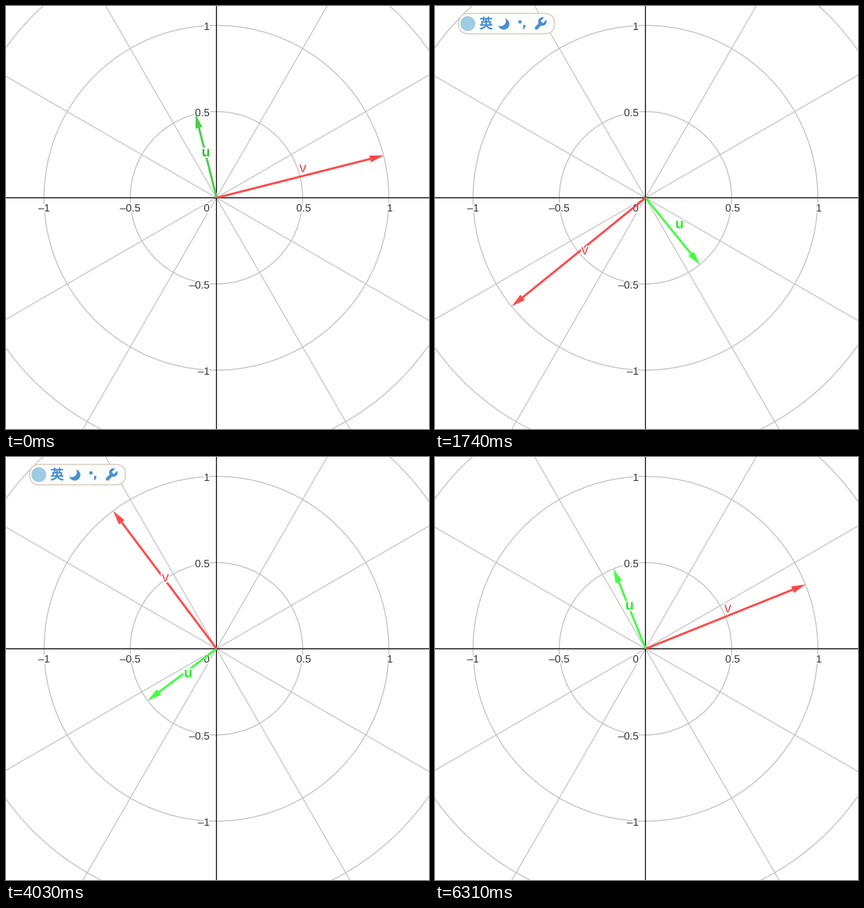
Recreate the animation shown at these times as a matplotlib script. Size 600 by 600 pixels, loop 6440 ms.

```python
import numpy as np
import matplotlib.pyplot as plt
from matplotlib.animation import FuncAnimation
from matplotlib.patches import Circle, FancyBboxPatch, Polygon
from matplotlib.patheffects import withStroke

SIZE, DPI = 600, 100
PT = 72 / DPI                      # points per pixel
LOOP_MS, TICK_MS = 6440, 20
CX, CY, UNIT = 298.5, 272.0, 244.5

RED, GREEN, FIRST_GREEN = "#ff4a4a", "#42ff42", "#48d048"
BLUE = "#4a90cf"

# (step, start in ms, angle of v in degrees); steps between are interpolated
KNOTS = np.array([
    (0, 0, 14.2), (6, 740, 109.8), (9, 1120, 157.2), (11, 1370, 185),
    (12, 1490, 185), (16, 2000, 253), (17, 2140, 267), (18, 2250, 282),
    (19, 2390, 300.9), (24, 3020, 363.5), (25, 3130, 378.5),
    (27, 3390, 408.3), (28, 3530, 424.3), (30, 3780, 456.2),
    (31, 3920, 472), (32, 4030, 486.9), (33, 4170, 502),
    (34, 4280, 516.3), (35, 4420, 531.5), (36, 4540, 547.5),
    (37, 4660, 547.5), (38, 4790, 563.5), (43, 5430, 637.8),
    (44, 5560, 652.6), (45, 5670, 667.3), (46, 5810, 682.2),
    (50, 6310, 741.9),
])
STEPS = np.arange(51)
STARTS = np.round(np.interp(STEPS, KNOTS[:, 0], KNOTS[:, 1]), -1)
ANGLES = np.interp(STEPS, KNOTS[:, 0], KNOTS[:, 2])
BAR_ON, BAR_OFF = 2, 49            # steps at which the input bar shows and hides

plt.rcParams["font.family"] = "Liberation Sans"
fig = plt.figure(figsize=(SIZE / DPI, SIZE / DPI), dpi=DPI, facecolor="white")
ax = fig.add_axes([0, 0, 1, 1])
ax.set_xlim(0, SIZE)
ax.set_ylim(SIZE, 0)
ax.axis("off")


def halo(px):
    return [withStroke(linewidth=px * PT, foreground="white")]


def line(xs, ys, color, px, z, **kw):
    return ax.plot(xs, ys, color=color, lw=px * PT, zorder=z, **kw)[0]


def draw_grid():
    for n in (1, 2, 3):
        ax.add_patch(Circle((CX, CY), n * UNIT / 2, fill=False, ec="#c3c3c3",
                            lw=1.4 * PT, zorder=1))
    for deg in (30, 60, 120, 150):
        dx, dy = 700 * np.cos(np.radians(deg)), 700 * np.sin(np.radians(deg))
        line([CX - dx, CX + dx], [CY + dy, CY - dy], "#c3c3c3", 1.3, 1)
    line([0, SIZE], [CY, CY], "#3c3c3c", 1.8, 3, snap=False)
    line([CX, CX], [0, SIZE], "black", 1.3, 3, snap=False)


def draw_ticks():
    def tick(x, y, s, ha):
        ax.text(x, y, s, ha=ha, va="baseline", fontsize=15 * PT,
                color="#333333", path_effects=halo(4), zorder=2)

    for value, s in ((-1, "–1"), (-0.5, "–0.5"), (0.5, "0.5"), (1, "1")):
        tick(CX + value * UNIT + (1 if value > 0 else 0) - 0.5 * (value < 0) + 0.5,
             291.5, s, "center")
        tick(289, CY - value * UNIT + 6.5, s, "right")
    tick(289, 291.5, "0", "right")


def draw_bar():
    """Input-method bar in the top left corner."""
    def disc(x, y, r, color, z):
        return ax.add_patch(Circle((x, y), r, fc=color, ec="none", zorder=z))

    fill = "#fdfdfc"
    pill = FancyBboxPatch((33.5, 10.5), 136, 29,
                          boxstyle="round,pad=0,rounding_size=14.5",
                          fc=fill, ec="#dccdbf", lw=1.6 * PT, zorder=10)
    ax.add_patch(pill)
    glyph = ax.text(72.5, 31.5, "英", family="Noto Sans CJK JP", ha="center",
                    va="baseline", fontsize=19 * PT, color=BLUE, zorder=11,
                    path_effects=[withStroke(linewidth=0.8 * PT, foreground=BLUE)])
    return [
        pill, glyph,
        disc(46.5, 25, 10.5, "#9fcbe3", 11),
        disc(97.5, 25.5, 8, BLUE, 11),
        disc(93.3, 21.3, 7.2, fill, 12),
        disc(120.5, 22.5, 2.4, BLUE, 11),
        disc(126.5, 28.5, 1.8, BLUE, 11),
        line([127.2, 125.6], [29, 32], BLUE, 1.8, 11),
        line([143.8, 151], [31.3, 24], BLUE, 4.6, 11, solid_capstyle="round"),
        disc(152.3, 22, 6, BLUE, 11),
        line([153, 159], [21.3, 15.3], fill, 4.4, 12),
    ]


class Vector:
    HEAD, HALF = 20, 5

    def __init__(self, name, length, color, text_color, weight):
        self.length = length
        self.shaft = line([], [], color, 3, 5, solid_capstyle="butt")
        self.head = ax.add_patch(Polygon(np.zeros((3, 2)), fc=color, ec="none",
                                         zorder=5))
        self.label = ax.text(0, 0, name, ha="center", va="baseline",
                             fontsize=20 * PT, color=text_color, weight=weight,
                             path_effects=halo(4), zorder=6)

    def aim(self, deg):
        a = np.radians(deg)
        start = np.array([CX + 0.3, CY])
        along = np.array([np.cos(a), -np.sin(a)])
        normal = np.array([-np.sin(a), -np.cos(a)])
        tip = start + self.length * along
        base = tip - self.HEAD * along
        self.shaft.set_data(*np.transpose([start, base + along]))
        self.head.set_xy([tip, base + self.HALF * normal, base - self.HALF * normal])
        x, y = (start + tip) / 2 + 5.6 * normal + (5.2, -6.3)
        self.label.set_position((x, y + 5.5))

    def paint(self, color, text_color):
        self.shaft.set_color(color)
        self.head.set_facecolor(color)
        self.label.set_color(text_color)


draw_grid()
draw_ticks()
bar = draw_bar()
u = Vector("u", UNIT / 2, GREEN, "#2cf02c", "bold")
v = Vector("v", UNIT, RED, "#f54545", "normal")


def update(i):
    t = i * TICK_MS + TICK_MS / 2
    step = np.searchsorted(STARTS, t, side="right") - 1
    v.aim(ANGLES[step])
    u.aim(ANGLES[step] + 90)
    if step == 0:
        u.paint(FIRST_GREEN, "#38c038")
    else:
        u.paint(GREEN, "#2cf02c")
    for part in bar:
        part.set_visible(BAR_ON <= step < BAR_OFF)
    return []


anim = FuncAnimation(fig, update, frames=LOOP_MS // TICK_MS, interval=TICK_MS,
                     repeat=True, repeat_delay=0, blit=False)
plt.show()
```
